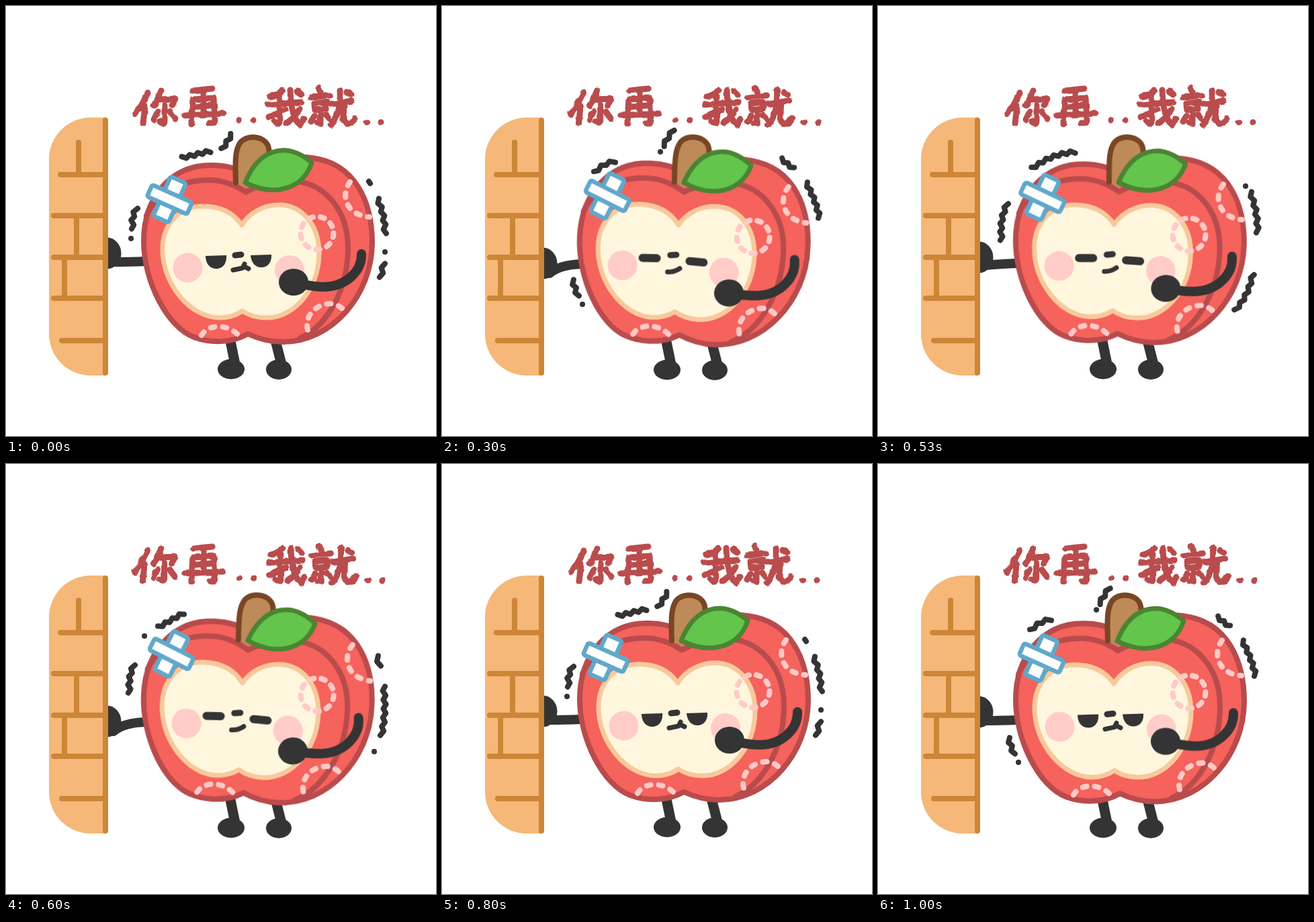
Recreate the animation shown at these times as an HTML page. Size 640 by 640 pixels, loop 1.2 s.

```html
<!DOCTYPE html>
<html lang="zh">
<head>
<meta charset="utf-8">
<title>Apple at the wall</title>
<style>
  html, body { margin: 0; width: 100%; height: 100%; overflow: hidden; background: #fff; }
  svg { display: block; width: 100%; height: 100%; }
  path, line { fill: none; stroke-linecap: round; stroke-linejoin: round; }

  .ink { stroke: #343434; }
  .inkfill { fill: #343434; }
  .skin { fill: #f6625c; stroke: #b94b4c; stroke-width: 8; }
  .rim { stroke: #b94b4c; stroke-width: 8; }
  .flesh { fill: #fff6de; stroke: #f8c99c; stroke-width: 7; }
  .cheek { fill: #ffccc8; }
  .spots { stroke: #ffcac7; stroke-width: 8; stroke-dasharray: 6 12; }
  .tape { fill: #fff; stroke: #60a8ca; stroke-width: 6.5; }
  .brick { stroke: #cd8538; stroke-width: 8; }
  .letters { stroke: #ba4c4d; stroke-width: 9; }
  .marks { stroke: #343434; stroke-width: 8; }

  .step { animation: 1200ms step-end infinite; }
  .beat { animation: 400ms step-end infinite; }

  /* two alternating drawings */
  #wordsA { animation-name: first; }
  #wordsB { animation-name: second; }
  @keyframes first { 0% { visibility: visible; } 50%, 100% { visibility: hidden; } }
  @keyframes second { 0% { visibility: hidden; } 50%, 100% { visibility: visible; } }

  #bob { transform-origin: 375px 191px; animation-name: bob; }
  #feet, #reach { animation-name: sink; }
  @keyframes bob { 0% { transform: none; } 50%, 100% { transform: scaleY(1.008); } }
  @keyframes sink { 0% { transform: none; } 50%, 100% { transform: translateY(1px); } }

  #tilt { transform-origin: 375px 345px; animation-name: tilt; }
  @keyframes tilt {
    0% { transform: none; }
    16.66% { transform: rotate(2.7deg); }
    27.5% { transform: rotate(2.1deg); }
    33.33% { transform: rotate(1.4deg); }
    39.16% { transform: rotate(2.7deg); }
    44.16% { transform: rotate(1.4deg); }
    50% { transform: rotate(2.7deg); }
    55.83%, 100% { transform: none; }
  }

  #fist { transform-origin: 529px 369px; animation-name: fist; }
  @keyframes fist {
    0% { transform: none; }
    16.66% { transform: translateX(-3px) rotate(-6.8deg); }
    27.5% { transform: translateX(-2px) rotate(-5.5deg); }
    33.33% { transform: translateX(-1.5px) rotate(-4.6deg); }
    39.16% { transform: translateX(-3px) rotate(-6.8deg); }
    44.16% { transform: translateX(-1.5px) rotate(-4.6deg); }
    50% { transform: translateX(-3px) rotate(-6.8deg); }
    55.83%, 100% { transform: none; }
  }

  #palm { animation-name: palm; }
  @keyframes palm {
    0% { transform: none; }
    16.66% { transform: translateY(14px); }
    27.5% { transform: translateY(10px); }
    33.33% { transform: translateY(6px); }
    39.16% { transform: translateY(14px); }
    44.16% { transform: translateY(6px); }
    50% { transform: translateY(14px); }
    55.83%, 100% { transform: none; }
  }

  #arm { d: path("M160 381Q180 381 208 380"); animation-name: arm; }
  @keyframes arm {
    0% { d: path("M160 381Q180 381 208 380"); }
    16.66% { d: path("M160 397Q175 384 208 383"); }
    27.5% { d: path("M160 392Q176 384 208 383"); }
    33.33% { d: path("M160 386Q180 384 208 383"); }
    39.16% { d: path("M160 397Q175 384 208 383"); }
    44.16% { d: path("M160 386Q180 384 208 383"); }
    50% { d: path("M160 397Q175 384 208 383"); }
    55.83%, 100% { d: path("M160 381Q180 381 208 380"); }
  }

  #glare { animation-name: glare; }
  #squint { animation-name: squint; }
  @keyframes glare {
    0% { visibility: visible; }
    16.66% { visibility: hidden; }
    55.83%, 100% { visibility: visible; }
  }
  @keyframes squint {
    0% { visibility: hidden; }
    16.66% { visibility: visible; }
    55.83%, 100% { visibility: hidden; }
  }

  #shake0 { animation-name: shake0; }
  #shake1 { animation-name: shake1; }
  #shake2 { animation-name: shake2; }
  #shake3 { animation-name: shake3; }
  #shake4 { animation-name: shake4; }
  @keyframes shake0 {
    0%, 66.66% { visibility: visible; }
    16.66%, 75%, 100% { visibility: hidden; }
  }
  @keyframes shake1 {
    0%, 25%, 83.33%, 100% { visibility: hidden; }
    16.66%, 75% { visibility: visible; }
  }
  @keyframes shake2 {
    0%, 50%, 100% { visibility: hidden; }
    33.33% { visibility: visible; }
  }
  @keyframes shake3 {
    0%, 66.66%, 100% { visibility: hidden; }
    50% { visibility: visible; }
  }
  @keyframes shake4 {
    0%, 33.33% { visibility: hidden; }
    25%, 83.33%, 100% { visibility: visible; }
  }
</style>
</head>
<body>
<svg viewBox="0 0 640 640">
  <defs>
    <filter id="roughA" filterUnits="userSpaceOnUse" x="170" y="100" width="420" height="100" color-interpolation-filters="sRGB">
      <feTurbulence type="fractalNoise" baseFrequency=".11" seed="4"/>
      <feDisplacementMap in="SourceGraphic" scale="5" xChannelSelector="R" yChannelSelector="G"/>
    </filter>
    <filter id="roughB" filterUnits="userSpaceOnUse" x="170" y="100" width="420" height="100" color-interpolation-filters="sRGB">
      <feTurbulence type="fractalNoise" baseFrequency=".11" seed="9"/>
      <feDisplacementMap in="SourceGraphic" scale="5" xChannelSelector="R" yChannelSelector="G"/>
    </filter>
    <g id="words" class="letters">
      <path d="M211 129Q203 148 192 161M207 149L204 175M231 126Q227 139 220 148M229 139L252 138L247 148M236 147L236 172Q234 177 229 172M226 157L220 169M244 157L252 168"/>
      <path d="M278 126L307 123M278 139L276 175M279 139L309 137L311 170Q310 177 303 174M294 126L294 161M282 150L305 148M266 163L323 160"/>
      <path d="M347 170h.1M368 170h.1"/>
      <path d="M411 126Q403 133 393 135M390 147L440 143M407 133L408 172Q406 177 399 171M391 165L416 154M423 125Q424 165 438 177L443 168M437 153Q430 166 418 174M434 127L439 132"/>
      <path d="M465 122L468 128M454 136L482 133M459 145L477 143L476 153L460 155ZM468 156L468 175L462 174M459 164L454 172M476 162L481 168M485 146L515 141M497 125Q499 160 484 177M503 147L502 168Q504 177 514 175L519 167M507 128L513 132"/>
      <path d="M537 173h.1M558 173h.1"/>
    </g>
  </defs>

  <g role="img" aria-label="你再..我就..">
    <g id="wordsA" class="beat"><use href="#words" filter="url(#roughA)"/></g>
    <g id="wordsB" class="beat"><g transform="translate(-2) scale(1.007 1)"><use href="#words" filter="url(#roughB)"/></g></g>
  </g>

  <g id="reach" class="beat">
    <ellipse id="palm" class="step inkfill" cx="150" cy="368" rx="21.5" ry="23.5"/>
    <path id="arm" class="step ink" stroke-width="14"/>
  </g>

  <g id="wall">
    <path d="M148 166H126A62 62 0 0 0 64 228V488A62 62 0 0 0 126 550H148Z" style="fill:#f5b878"/>
    <path class="brick" d="M148 170V546M108 203V247M81 251H147M71 312H147M105 316V371M71 374H147M87 378V432M71 435H147M83 498H147"/>
  </g>

  <g id="feet" class="beat">
    <path class="ink" stroke-width="15" d="M333 494L341 533M400 494L410 533"/>
    <ellipse class="inkfill" cx="335" cy="540.5" rx="20" ry="15"/>
    <ellipse class="inkfill" cx="406" cy="541" rx="19" ry="15"/>
  </g>

  <g id="bob" class="beat"><g id="tilt" class="step">
    <path class="skin" d="M360 488C335 502 305 502 280 493C240 478 205 410 205 350C205 285 245 237 305 237C330 237 345 242 358 250C385 232 420 221 455 226C520 234 545 292 545 352C545 430 485 500 412 500C390 500 375 495 360 488Z"/>
    <path class="rim" d="M209 312C225 275 265 259 302 259C325 259 342 267 357 277C375 267 400 260 420 260C475 260 509 305 509 360C509 420 480 475 437 495"/>
    <path class="flesh" d="M351 326C338 307 318 298 293 298C258 298 233 325 233 362C233 415 275 464 318 464C332 464 343 460 352 454C362 461 374 464 388 464C430 464 466 420 466 368C466 325 440 296 406 296C383 296 362 308 351 326Z"/>

    <path style="fill:#bd8a58" d="M342 263C341 235 341 218 346 208C352 191 383 191 390 208C396 224 380 245 357 271Z"/>
    <path stroke="#784625" stroke-width="8" d="M342 263C341 235 341 218 346 208C352 191 383 191 390 208Q393 216 390 226"/>
    <path style="fill:#63c54b" stroke="#4b8432" stroke-width="7" d="M356 263C375 215 415 199 455 233C443 272 400 285 356 263Z"/>

    <g class="tape" transform="translate(243.5 288) rotate(24)">
      <rect x="-12.5" y="-32" width="25" height="64" rx="3"/>
      <rect x="-32.5" y="-9.5" width="65" height="19" rx="3"/>
    </g>

    <g class="spots">
      <path d="M512 262C497 282 507 312 541 314"/>
      <circle cx="463" cy="338" r="24.5" fill="none" stroke-linecap="round" stroke-dasharray="6 11.1"/>
      <path d="M449 482C444 462 460 444 482 443Q492 443 500 450"/>
      <path d="M291 490C300 474 328 472 345 489"/>
    </g>

    <circle class="cheek" cx="270.5" cy="389.5" r="22"/>
    <circle class="cheek" cx="422" cy="393" r="22"/>
    <path class="ink" stroke-width="9" d="M341 371L350 370"/>
    <g id="glare" class="step">
      <path class="inkfill" style="fill:#343434" d="M297 372L328 371C329 385 321 391 313 391C304 391 297 384 297 372Z"/>
      <path class="inkfill" style="fill:#343434" d="M364 371L395 370C396 382 389 389 380 389C371 389 365 382 364 371Z"/>
      <path class="ink" stroke-width="7" d="M338 393L352 390L355 384M355 388L361 391"/>
    </g>
    <g id="squint" class="step ink">
      <path stroke-width="12" d="M300 377L321 376.5M370 378.5L391 379.5"/>
      <path stroke-width="7" d="M338 396Q348 396 356 390"/>
    </g>

    <g id="fist" class="step">
      <path class="ink" stroke-width="14" d="M529 369C530 395 505 419 470 418Q450 417 428 411"/>
      <ellipse class="inkfill" cx="428" cy="411" rx="22" ry="20"/>
    </g>
  </g></g>

  <g id="shakes" class="marks"></g>
</svg>
<script>
  // Each mark: x1, y1, x2, y2, sideways bow; a pair of numbers is a dot.
  const shakes = [
    [[262, 226, 304, 216], [322, 213, 336, 191], [194, 301, 189, 332, 3], [186, 346],
     [540, 261, 542, 264], [553, 287, 564, 339, -3], [564, 366], [562, 383, 558, 404]],
    [[233, 238, 283, 217], [202, 265, 198, 271], [184, 315, 184, 343, 2],
     [562, 387, 548, 431, -2], [535, 450], [514, 475, 500, 487]],
    [[229, 242, 293, 217, -5], [192, 294, 184, 349, 4], [547, 268],
     [554, 277, 565, 337, -3], [558, 399, 532, 453, -4]],
    [[227, 243, 264, 222], [206, 256], [190, 299, 184, 341, 3],
     [552, 286, 556, 301], [562, 331, 559, 404, -3], [548, 428]],
    [[227, 248, 257, 231, -3], [344, 184, 329, 208], [325, 217], [505, 228, 523, 242],
     [542, 263, 562, 315, -2], [194, 408, 202, 432], [209, 444]]
  ];

  function squiggle([x1, y1, x2, y2, bow = 0]) {
    if (x2 === undefined) return `M${x1} ${y1}h.1`;
    const dx = x2 - x1, dy = y2 - y1, len = Math.hypot(dx, dy);
    const n = Math.max(1, Math.round(len / 6.5));
    const points = [];
    for (let i = 0; i <= n; i++) {
      const u = i / n;
      const side = bow * Math.sin(Math.PI * u) + (n > 1 ? (i % 2 ? 2 : -2) : 0);
      points.push(`${(x1 + dx * u - dy / len * side).toFixed(1)} ${(y1 + dy * u + dx / len * side).toFixed(1)}`);
    }
    return 'M' + points.join('L');
  }

  document.getElementById('shakes').innerHTML = shakes
    .map((set, i) => `<path id="shake${i}" class="step" d="${set.map(squiggle).join('')}"/>`)
    .join('');
</script>
</body>
</html>
```
